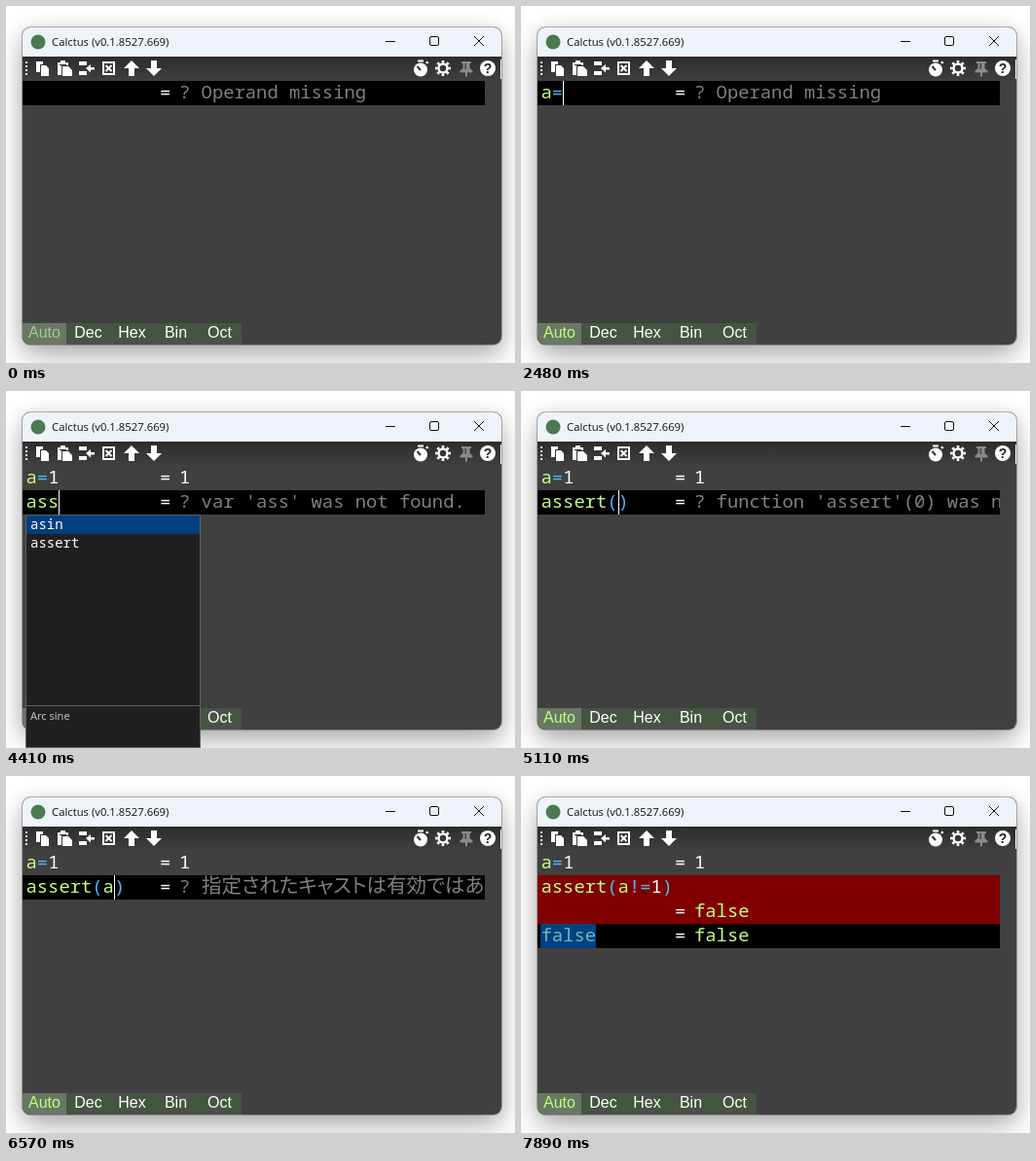
An HTML page for the animation above (8000 ms loop, 523 by 367 pixels).

```html
<!DOCTYPE html>
<html lang="en">
<head>
<meta charset="utf-8">
<title>Calculator</title>
<style>
  html, body { margin: 0; width: 100%; height: 100%; overflow: hidden; background: #fff; }
  #shade {
    position: absolute; left: 17px; top: 22px; width: 492px; height: 326px; border-radius: 8px;
    box-shadow: 0 2px 18px rgba(0,0,0,.14), 0 14px 30px rgba(0,0,0,.26);
  }
  svg { position: absolute; left: 0; top: 0; display: block; }
  text { white-space: pre; }
  .title { font: 11.3px "Open Sans", sans-serif; fill: #111; }
  .mono { font: 18.83px "Noto Sans Mono", monospace; }
  .cjk { font: 20.5px "Noto Sans CJK JP", "Noto Sans CJK", sans-serif; font-feature-settings: "palt"; }
  .tab { font: 16px "Liberation Sans", Arial, sans-serif; fill: #fff; text-anchor: middle; }
  .list { font: 14px "Noto Sans Mono", monospace; fill: #fff; }
  .hint { font: 11px "Noto Sans", sans-serif; fill: #c0c0c0; }
</style>
</head>
<body>
<div id="shade"></div>
<svg width="523" height="367" viewBox="0 0 523 367">
  <defs>
    <clipPath id="frame"><rect x="17" y="22" width="492" height="326" rx="8"/></clipPath>
    <clipPath id="sheet"><rect x="17" y="77" width="475" height="249"/></clipPath>
    <linearGradient id="bar" x2="0" y2="1">
      <stop offset="0" stop-color="#2c2c2c"/><stop offset="1" stop-color="#404040"/>
    </linearGradient>
  </defs>
  <g clip-path="url(#frame)">
    <rect x="17" y="22" width="492" height="326" fill="#404040"/>
    <rect x="17" y="22" width="492" height="30" fill="#eef3f9"/>
    <rect x="17" y="52" width="492" height="25" fill="url(#bar)"/>
    <rect x="508" y="55" width="1" height="20" fill="#fff"/>
    <rect x="17" y="326" width="225" height="22" fill="#465443"/>
    <rect x="17" y="326" width="45" height="22" fill="#687864"/>
  </g>
  <rect x="16.5" y="21.5" width="493" height="327" rx="8.5" fill="none" stroke="#000" stroke-opacity=".27"/>

  <circle cx="33" cy="37" r="7.5" fill="#4b7a50"/>
  <text class="title" x="47" y="41">Calctus (v0.1.8527.669)</text>
  <g fill="none" stroke="#111">
    <path d="M390 36.5h10M481 31l10 10M491 31l-10 10"/>
    <rect x="435.5" y="31.5" width="9" height="9" rx="1.5"/>
  </g>

  <g fill="#fff">
    <path d="M20 57h2v2h-2zM20 61h2v2h-2zM20 65h2v2h-2zM20 69h2v2h-2z"/>
    <path d="M31 57h7v3h-3v8h-4zM36 61h5l3 3v8h-8z"/>
    <path d="M53 58h3v-2h5v2h3v3h-2v-1h-7v1h2v10h-4zM58 62h6l4 4v6h-10z"/>
    <path d="M75 57h8v4h-8zM75 67h8v4h-8zM82 64l5-4v3h4v2.500h-4v3z"/>
    <path d="M121 64l8-8 8 8h-5v8h-6v-8zM144 64h5v-8h6v8h5l-8 8z"/>
    <circle cx="426" cy="65.500" r="7"/>
    <path d="M423 55.500h6v2h-6zM431 58l2-1.500 1.500 2-2 1z"/>
    <circle cx="495" cy="64" r="8"/>
  </g>
  <g fill="none" stroke="#fff" stroke-width="2">
    <rect x="100" y="58" width="11" height="12"/>
    <path d="M102.500 61l6 6M108.500 61l-6 6"/>
    <circle cx="449" cy="64" r="4.500" stroke-width="2.500"/>
    <circle cx="449" cy="64" r="6.700" stroke-width="2.600" pathLength="16" stroke-dasharray="1 1" stroke-dashoffset=".5"/>
  </g>
  <path d="M426 66l-3.500-4" stroke="#333" stroke-width="2"/>
  <path d="M468 57h10v2h-1.500v5l3 2.500v2h-5.500v4h-2v-4h-5.500v-2l3-2.500v-5h-1.500z" fill="#8a8a8a"/>
  <path d="M471.500 59h1.500v6h-1.500z" fill="#444"/>
  <text x="495" y="69" text-anchor="middle" fill="#222" font-family="Liberation Sans, sans-serif" font-weight="700" font-size="14">?</text>

  <g id="tabs"></g>
  <g id="rows" clip-path="url(#sheet)"></g>
  <g id="popup"></g>
</svg>
<script>
const LOOP = 8000, BLINK = 505;
const TOP = 77, ROW = 25, LEFT = 20.5, PITCH = 11.3, BASE = 18;
const GREEN = "#c0ff80", BLUE = "#48b8f8", WHITE = "#fff", GREY = "#808080";

const byId = id => document.getElementById(id);
const rect = (x, y, w, h, fill) => `<rect x="${x}" y="${y}" width="${w}" height="${h}" fill="${fill}"/>`;
const label = (cls, x, y, text, fill) =>
  `<text class="${cls}" x="${x}" y="${y}"${fill ? ` fill="${fill}"` : ""}>${text}</text>`;

const missing = "? Operand missing";
const unknown = name => `? var '${name}' was not found.`;
const badCast = "? 指定されたキャストは有効ではありません。";
const first = ["a=1", "1"], check = ["assert(a!=1)", "false"];
const names = ["abs", "acos", "aggregate", "all", "any", "array", "asin", "assert", "atan"];
const withVar = ["a", ...names];

// at: start, rows: [input, answer], caret: column, key: blink start, list: suggestions, col: their column
const steps = [
  { at: 0, rows: [["", missing]], caret: 0, key: 510 },
  { at: 2020, rows: [["a", unknown("a")]], caret: 1, list: names },
  { at: 2480, rows: [["a=", missing]], caret: 2 },
  { at: 2880, rows: [first], caret: 3 },
  { at: 3280, rows: [first, ["1", "1"]], caret: 1 },
  { at: 3350, rows: [first, ["1", "1"]], caret: 1, key: 3280, select: true },
  { at: 3900, rows: [first, ["a", "1"]], caret: 1, list: withVar },
  { at: 4200, rows: [first, ["as", unknown("as")]], caret: 2, list: ["asin", "assert"] },
  { at: 4410, rows: [first, ["ass", unknown("ass")]], caret: 3, list: ["asin", "assert"] },
  { at: 4460, rows: [first, ["ass", unknown("ass")]], caret: 3, list: ["assert"] },
  { at: 4660, rows: [first, ["asse", unknown("asse")]], caret: 4, list: ["assert"] },
  { at: 5110, rows: [first, ["assert()", "? function 'assert'(0) was not found."]], caret: 7 },
  { at: 6020, rows: [first, ["assert(a)", badCast]], caret: 8 },
  { at: 6070, rows: [first, ["assert(a)", badCast]], caret: 8, list: withVar, col: 7 },
  { at: 6570, rows: [first, ["assert(a)", badCast]], caret: 8 },
  { at: 6620, rows: [first, ["assert(a!)", missing]], caret: 9 },
  { at: 6720, rows: [first, ["assert(a!=)", missing]], caret: 10 },
  { at: 7130, rows: [first, check], caret: 11 },
  { at: 7380, rows: [first, check, ["false", "false"]], caret: 5 },
  { at: 7430, rows: [first, check, ["false", "false"]], caret: 5, key: 7380, select: true }
];

const hints = { a: "User-defined variable", abs: "Absolute value", asin: "Arc sine", assert: "Checks a condition" };

function paint(source) {
  return source.replace(/[a-z]+|\d+|[^a-z\d]+/g, part => {
    const fill = /[a-z]/.test(part) ? GREEN : /\d/.test(part) ? WHITE : BLUE;
    return `<tspan fill="${fill}">${part}</tspan>`;
  });
}

function answer(text, y) {
  const eq = label("mono", 158, y, "=", WHITE);
  if (text === badCast)
    return eq + label("mono", 178, y, "?", GREY) + label("cjk", 201, y, text.slice(2), GREY);
  const fill = text[0] === "?" ? GREY : /[a-z]/.test(text) ? GREEN : WHITE;
  return eq + label("mono", 178, y, text, fill);
}

function drawRows(step, caretOn) {
  let y = TOP, out = "";
  step.rows.forEach(([source, result], i) => {
    const active = i === step.rows.length - 1;
    const lines = source.length > 11 ? 2 : 1;
    const back = active ? "#000" : source === check[0] ? "#800000" : "";
    if (back) out += rect(17, y, 475, ROW * lines, back);
    out += label("mono", LEFT, y + BASE, paint(source));
    out += answer(result, y + ROW * (lines - 1) + BASE);
    if (active) {
      const x = step.caret ? Math.round(LEFT + step.caret * PITCH) : 17;
      if (step.select) out += rect(20, y, x - 20, ROW, "rgba(0,128,255,.5)");
      if (caretOn) out += rect(x, y, 1, ROW, WHITE);
    }
    y += ROW * lines;
  });
  return out;
}

function drawPopup({ list, rows, col = 0 }) {
  if (!list) return "";
  const x = Math.floor(LEFT + col * PITCH + .4), y = TOP + ROW * rows.length;
  let out = rect(x, y, 180, 240, "#606060") + rect(x + 1, y + 1, 178, 238, "#202020");
  out += rect(x + 1, y + 1, 178, 19, "#004080");
  list.forEach((name, i) => out += label("list", x + 5, y + 15 + 19 * i, name));
  out += rect(x + 1, y + 196, 178, 1, "#606060");
  return out + label("hint", x + 5, y + 211, hints[list[0]]);
}

function drawTabs(used) {
  return ["Auto", "Dec", "Hex", "Bin", "Oct"].map((name, i) => {
    const fill = i ? WHITE : used ? GREEN : "#a8c890";
    return `<text class="tab" x="${39.5 + 45 * i}" y="341" style="fill:${fill}">${name}</text>`;
  }).join("");
}

let shown = "";
function render(t) {
  const step = steps.findLast(s => s.at <= t);
  const age = t - (step.key ?? step.at);
  const caretOn = age >= 0 && Math.floor(age / BLINK) % 2 === 0;
  const state = step.at + "/" + caretOn;
  if (state === shown) return;
  shown = state;
  byId("tabs").innerHTML = drawTabs(t >= 2020);
  byId("rows").innerHTML = drawRows(step, caretOn);
  byId("popup").innerHTML = drawPopup(step);
}

const start = performance.now();
function tick() {
  render((performance.now() - start) % LOOP);
  requestAnimationFrame(tick);
}
tick();
</script>
</body>
</html>
```
